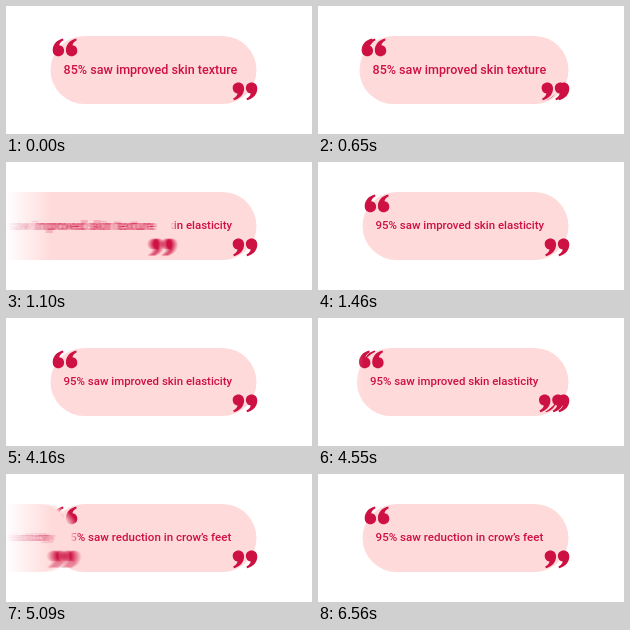
Animation of 306x128 px, one loop 8000 ms. Source, as an HTML page:

```html
<!DOCTYPE html>
<html lang="en">
<head>
<meta charset="utf-8">
<title>Survey results</title>
<style>
  html, body { margin: 0; width: 100%; height: 100%; overflow: hidden; background: #fff; }
  svg { display: block; width: 100vw; height: 100vh; }
  text { font-family: Roboto, "Open Sans", sans-serif; font-weight: 500; }
</style>
</head>
<body>
<svg id="stage" viewBox="0 0 306 128">
  <defs>
    <path id="mark" d="M10.2 0.3C4 1.8 0 6.3 0 12C0 15.8 2.4 18 5.7 18C9 18 11.4 15.7 11.4 12.5C11.4 9.4 9.3 7.3 6.6 7.1C6.9 5.2 8.4 3.4 10.9 2.1Z"/>
    <g id="quote">
      <use href="#mark"/>
      <use href="#mark" x="13.2"/>
    </g>
    <g id="card">
      <rect x="44.5" y="30" width="206" height="68" rx="34" fill="#ffdada"/>
      <use href="#quote" transform="translate(46.7 32.2)"/>
      <use href="#quote" transform="translate(251.3 94.6) rotate(180)"/>
    </g>
    <linearGradient id="fade">
      <stop offset="0" stop-color="#fff"/>
      <stop offset="1" stop-color="#fff" stop-opacity="0"/>
    </linearGradient>
    <filter id="smear" filterUnits="userSpaceOnUse" x="-60" y="0" width="720" height="128" color-interpolation-filters="sRGB">
      <feConvolveMatrix id="streak" order="1 1" kernelMatrix="1" edgeMode="none"/>
    </filter>
  </defs>
  <g id="slides" fill="#cd1142"></g>
  <rect width="46" height="128" fill="url(#fade)"/>
</svg>
<script>
const NS = 'http://www.w3.org/2000/svg';
const LOOP = 8000, MOVE = 1458, DISTANCE = 306;
const slides = [
  { text: '85% saw improved skin texture', size: 12.55, y: 67.7, leave: 480 },
  { text: '95% saw improved skin elasticity', size: 11.45, y: 67.2, leave: 4325 },
  { text: '95% saw reduction in crow’s feet', size: 11.57, y: 67.2, leave: Infinity }
];
const layer = document.getElementById('slides');
const streak = document.getElementById('streak');

function make(name, attrs, parent) {
  const el = document.createElementNS(NS, name);
  for (const key in attrs) el.setAttribute(key, attrs[key]);
  return parent.appendChild(el);
}

// Later slides lie beneath earlier ones.
for (const s of [...slides].reverse()) {
  s.group = make('g', {}, layer);
  make('use', { href: '#card' }, s.group);
  make('text', { x: 57.6, y: s.y, 'font-size': s.size }, s.group).textContent = s.text;
}

// Cubic Bezier easing (.73, 0, .27, 1), solved by bisection.
function ease(p) {
  if (p <= 0) return 0;
  if (p >= 1) return 1;
  let lo = 0, hi = 1;
  for (let i = 0; i < 24; i++) {
    const s = (lo + hi) / 2, r = 1 - s;
    const x = 3 * r * r * s * 0.73 + 3 * r * s * s * 0.27 + s * s * s;
    if (x < p) lo = s; else hi = s;
  }
  return lo * lo * (3 - 2 * lo);
}

const shiftAt = ms => DISTANCE * ease(ms / MOVE);

// Even horizontal motion blur, an odd number of pixels wide.
function setStreak(width) {
  streak.setAttribute('order', `${width} 1`);
  streak.setAttribute('kernelMatrix', Array(width).fill(1).join(' '));
}

function draw(t) {
  let revealed = true;
  for (const s of slides) {
    const age = t - s.leave;
    const shift = shiftAt(age);
    const shown = revealed && shift < 275;
    s.group.style.display = shown ? '' : 'none';
    s.group.setAttribute('transform', `translate(${-shift} 0)`);
    const speed = (shiftAt(age + 5) - shiftAt(age - 5)) / 10;
    const reach = Math.round(Math.max(0, 9 * speed - 1.5));
    if (shown && reach > 0) {
      setStreak(2 * reach + 1);
      s.group.setAttribute('filter', 'url(#smear)');
    } else {
      s.group.removeAttribute('filter');
    }
    revealed = revealed && age > 0;
  }
}

const start = performance.now();
function tick() {
  draw((performance.now() - start) % LOOP);
  requestAnimationFrame(tick);
}
tick();
</script>
</body>
</html>
```
